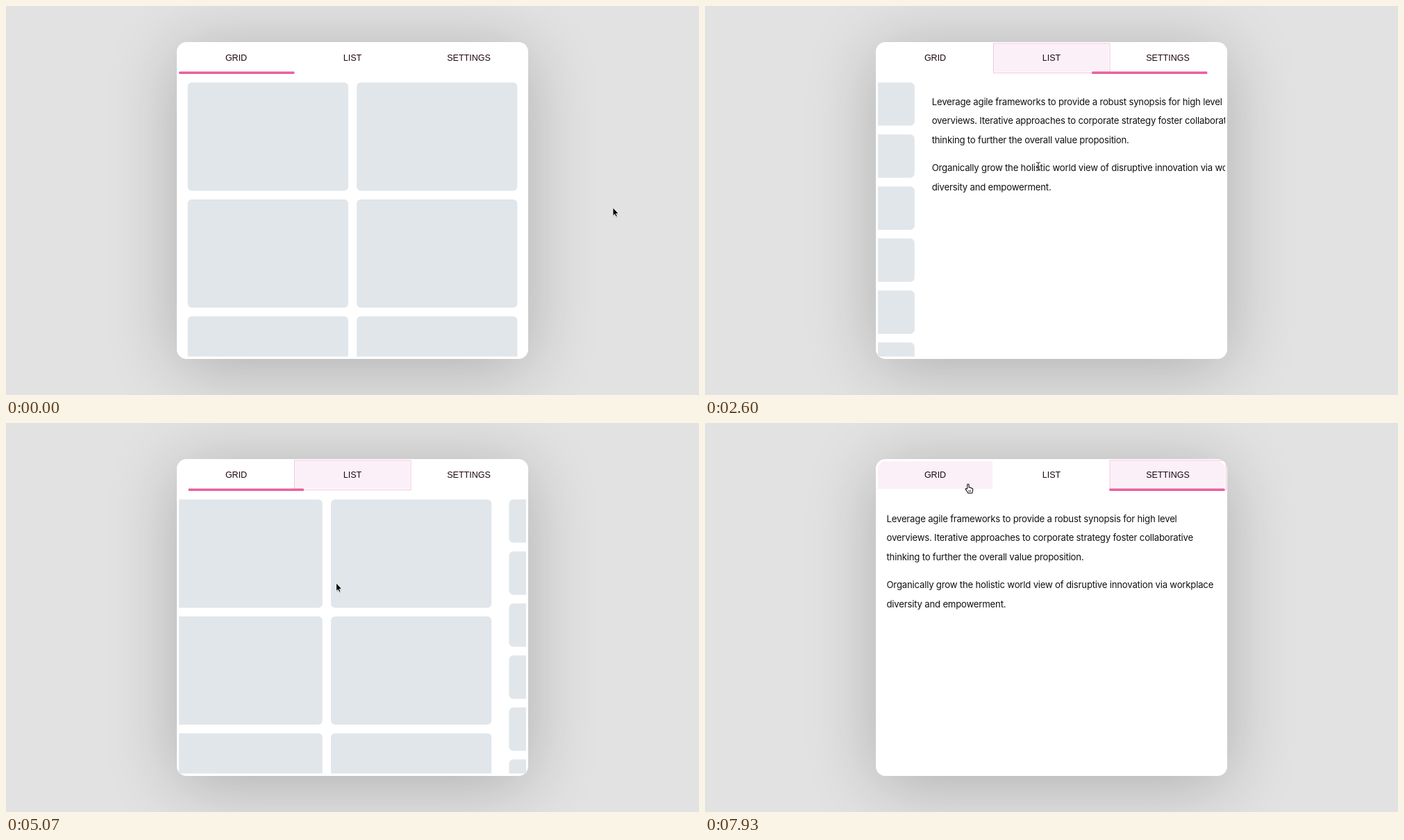
These frames come from a looping animation (998 px wide and 561 px high, 8 s). An HTML page:

```html
<!DOCTYPE html>
<html lang="en">
<head>
<meta charset="utf-8">
<title>Snap tabs</title>
<style>
  html, body { margin: 0; width: 100%; height: 100%; overflow: hidden; background: #e2e2e2; }
  .card {
    position: absolute; left: 246px; top: 52px; width: 506px; height: 456.5px;
    border-radius: 14px; background: #fff; box-shadow: 0 12px 100px rgba(0, 0, 0, .23);
  }
  svg { position: absolute; left: 0; top: 0; display: block; }
  .tab { font: 12.5px "Liberation Sans", Arial, sans-serif; fill: #1c0610; text-anchor: middle; }
  .copy { font: 13.2px Inter, sans-serif; letter-spacing: -.215px; fill: #111; }
</style>
</head>
<body>
<div class="card"></div>
<svg width="998" height="561" viewBox="0 0 998 561">
  <defs>
    <clipPath id="view"><rect x="249" y="100" width="500" height="405.5"/></clipPath>
    <clipPath id="head"><rect x="249" y="55" width="500" height="100" rx="11"/></clipPath>
    <path id="tip" d="M0 0V11.5L2.6 9.2 4.3 13 6.3 12.2 4.6 8.4H8z"/>
    <path id="caret" d="M-2.5-5.5Q0-5.5 0-4V4.5Q0 6-2.5 6M2.5-5.5Q0-5.5 0-4M0 4.5Q0 6 2.5 6M-1.3 1.6H1.3"/>
  </defs>
  <g clip-path="url(#view)"><g id="pages" fill="#e0e6ea"></g></g>
  <g id="tabs"></g>
  <rect id="bar" y="94.5" width="166.4" height="3.4" rx="1.2" fill="#e9609f"/>
  <g id="cursor" stroke-linejoin="round" stroke-linecap="round">
    <g id="arrow">
      <use href="#tip" x=".6" y="1.2" opacity=".2"/>
      <use href="#tip" stroke="#fff" stroke-width=".8"/>
    </g>
    <g id="hand" fill="#fff" stroke="#111" stroke-width="1.1" transform="translate(0 -1)">
      <path d="M-1.3 7V1.2a1.2 1.2 0 0 1 2.4 0V5q2-.6 2.3.6 1.8-.3 2 .8 1.6 0 1.3 1.7 0 2.8-1.3 5.2H0Q-1.4 10.2-3.8 7.8-3.9 6.2-2.5 6.6z"/>
      <path d="M1.2 9V11.4M3.2 9V11.4" stroke-width=".8"/>
    </g>
    <g id="beam" fill="none">
      <use href="#caret" stroke="#fff" stroke-width="2" opacity=".6"/>
      <use href="#caret" stroke="#222"/>
    </g>
  </g>
</svg>
<script>
const LOOP = 8000, LEFT = 249, PAGE = 500, TAB_W = 165, TAB_STEP = 167.5, BAR_STEP = 166.6, BAR_LAG = 14;
const $ = id => document.getElementById(id);

function add(parent, name, attrs, text) {
  const el = document.createElementNS("http://www.w3.org/2000/svg", name);
  for (const key in attrs) el.setAttribute(key, attrs[key]);
  if (text) el.textContent = text;
  parent.append(el);
  return el;
}

const flick = u => 1 - (1 - u) ** 3.23;
const glide = u => (1 - Math.cos(Math.PI * u)) / 2;

// Four swipes, then a click on the last tab
const scrolls = [
  { at: 1230, dur: 600, page: 1, focus: 1930, ease: flick },
  { at: 2339, dur: 560, page: 2, focus: 3000, ease: flick },
  { at: 3671, dur: 500, page: 1, focus: 4220, ease: flick },
  { at: 4463, dur: 1100, page: 0, focus: 5380, ease: flick },
  { at: 6773, dur: 600, page: 2, focus: 6680, ease: glide }
];

const strokes = [
  { at: 150, dur: 380, x: 439, y: 234 },
  { at: 530, dur: 140, x: 476, y: 231 },
  { at: 800, dur: 70, x: 480, y: 231 },
  { at: 4400, dur: 200, x: 475.5, y: 231 },
  { at: 5680, dur: 230, x: 395, y: 72 },
  { at: 5910, dur: 360, x: 685, y: 44 },
  { at: 6420, dur: 250, x: 640, y: 80 },
  { at: 6670, dur: 460, x: 591, y: 93 },
  { at: 7290, dur: 580, x: 379, y: 89 }
];

// Value of one property after all moves begun by time t
function travel(moves, t, key, value) {
  for (const { at, dur, ease = glide, [key]: goal } of moves)
    if (t > at) value += (goal - value) * ease(Math.min(1, (t - at) / dur));
  return value;
}

const pages = $("pages");
const box = (x, y, width, height) => add(pages, "rect", { x, y, width, height, rx: 6 });
for (let row = 0; row < 3; row++)
  for (let col = 0; col < 2; col++) box(261.6 + col * 243.5, 110.2 + row * 168.7, 231.3, 156.2);
for (let row = 0; row < 6; row++) box(261.6 + PAGE, 110.2 + row * 75.03, 475, 62.4);

const paragraphs = [
  ["Leverage agile frameworks to provide a robust synopsis for high level",
    "overviews. Iterative approaches to corporate strategy foster collaborative",
    "thinking to further the overall value proposition."],
  ["Organically grow the holistic world view of disruptive innovation via workplace",
    "diversity and empowerment."]
];
let baseline = 143;
for (const lines of paragraphs) {
  for (const line of lines) {
    add(pages, "text", { x: 261.5 + 2 * PAGE, y: baseline, class: "copy" }, line);
    baseline += 27.4;
  }
  baseline += 13.2;
}

const tabs = ["GRID", "LIST", "SETTINGS"].map((label, i) => {
  const x = LEFT + i * TAB_STEP, g = $("tabs");
  const clip = add(g, "g", { "clip-path": "url(#head)" });
  const fill = add(clip, "rect", { x, y: 55, width: TAB_W, height: 40 });
  const ring = add(g, "rect", { x: x - 1, y: 54, width: TAB_W + 2.5, height: 42.5, fill: "none" });
  add(g, "text", { x: x + TAB_W / 2, y: 79, class: "tab" }, label);
  return { x, fill, ring };
});

const show = (id, on) => $(id).setAttribute("visibility", on ? "visible" : "hidden");

function draw(t) {
  const page = travel(scrolls, t, "page", 0);
  const x = travel(strokes, t, "x", 874), y = travel(strokes, t, "y", 291);
  pages.setAttribute("transform", `translate(${-page * PAGE} 0)`);
  $("bar").setAttribute("x", LEFT + BAR_STEP * travel(scrolls, t - BAR_LAG, "page", 0));

  const last = scrolls.filter(s => s.focus <= t).pop();
  let onTab = false;
  tabs.forEach((tab, i) => {
    const over = y >= 54 && y < 96 && x >= tab.x && x < tab.x + TAB_W;
    const held = last && last.page === i;
    onTab = onTab || over;
    tab.fill.setAttribute("fill", over && held ? "#fedaea" : over || held ? "#fcf0f8" : "none");
    tab.ring.setAttribute("stroke", over ? "#f3a3c9" : "#f1c4de");
    tab.ring.setAttribute("opacity", held ? Math.min(1, (t - last.focus) / 120) : 0);
  });

  const textLeft = 261.5 + (2 - page) * PAGE;
  const onText = x > textLeft && x < textLeft + 475 && y > 125 && y < 275;
  $("cursor").setAttribute("transform", `translate(${x} ${y})`);
  show("hand", onTab);
  show("beam", onText);
  show("arrow", !onTab && !onText);
}

const start = performance.now();
function tick() {
  draw((performance.now() - start) % LOOP);
  requestAnimationFrame(tick);
}
draw(0);
requestAnimationFrame(tick);
</script>
</body>
</html>
```
